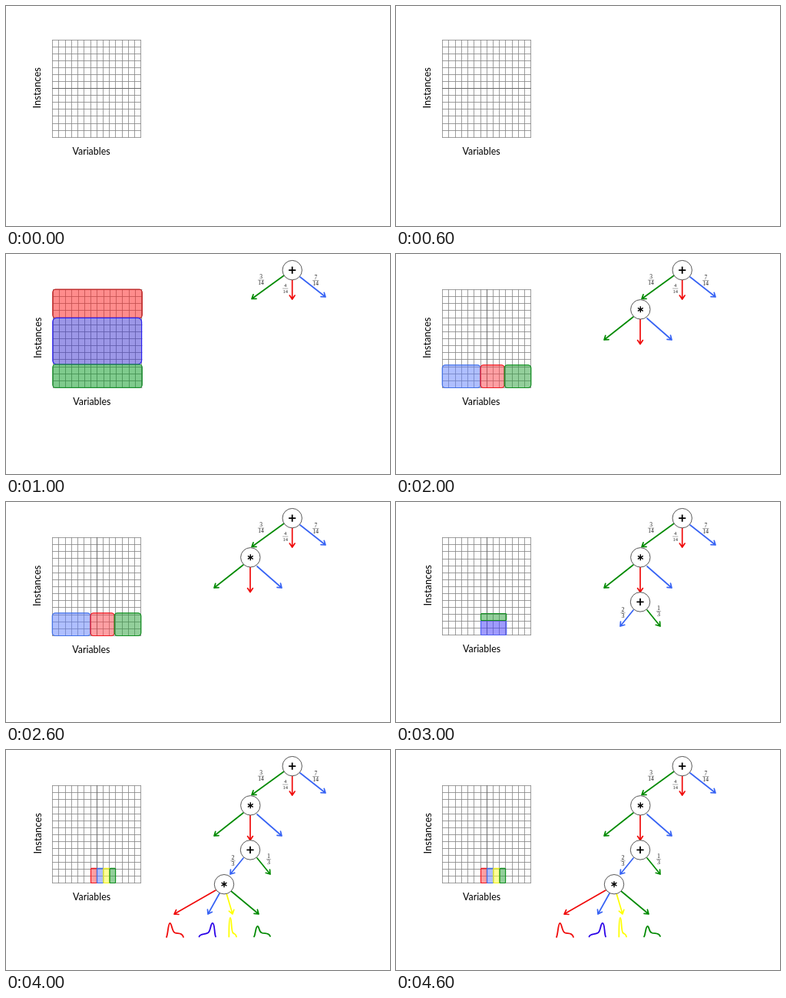
An HTML page that plays this animation: 500 by 287 pixels, repeating every 5000 ms.

```html
<!DOCTYPE html>
<html lang="en">
<head>
<meta charset="utf-8">
<title>Splitting a table into a sum-product tree</title>
<style>
html, body { margin: 0; width: 100%; height: 100%; overflow: hidden; background: #fff; }
svg { display: block; width: 500px; height: 287px; }
.label { font: 12.4px Lato, Carlito, sans-serif; }
.side { font-size: 13px; }
.frac { font-family: "Liberation Serif", serif; fill: #222; text-anchor: middle; }
</style>
</head>
<body>
<svg id="stage" viewBox="0 0 500 287"></svg>
<script>
const stage = document.getElementById('stage');
const GREEN = '#008a00', RED = '#f00a0a', BLUE = '#3763f4', YELLOW = '#ffff00';

const path = (d, color, width) =>
  `<path d="${d}" fill="none" stroke="${color}" stroke-width="${width}" stroke-linecap="round" stroke-linejoin="round"/>`;

const snap = v => Math.round(v - .5) + .5;

function grid(x, y, w, h) {
  const left = snap(x), top = snap(y);
  let d = '';
  for (let i = 0; i <= 14; i++) {
    d += `M${snap(x + i * w / 14)} ${top}v${h}M${left} ${snap(y + i * h / 14)}h${w}`;
  }
  return path(d, '#858585', .8);
}
const midline = () => path('M118.5 46.5v127', '#666', .9);

const labels = (x, y, sideX, sideY) =>
  `<text class="label" x="${x}" y="${y}">Variables</text>` +
  `<text class="label side" transform="translate(${sideX} ${sideY}) rotate(-90)">Instances</text>`;

const block = (x, y, w, h, fill, stroke, r = 4) =>
  `<rect x="${x}" y="${y}" width="${w}" height="${h}" rx="${r}" fill="${fill}" fill-opacity=".5" stroke="${stroke}" stroke-width="1.2"/>`;

function arrow(x1, y1, x2, y2, color) {
  const a = Math.atan2(y2 - y1, x2 - x1);
  const barb = s => `${x2 - 6 * Math.cos(a + s)} ${y2 - 6 * Math.sin(a + s)}`;
  return path(`M${x1} ${y1}L${x2} ${y2}M${barb(.6)}L${x2} ${y2}L${barb(-.6)}`, color, 1.7);
}

// A circle holding a symbol made of evenly turned strokes
function node(x, y, strokes, radius, width) {
  let d = '';
  for (let i = 0; i < strokes; i++) {
    const a = Math.PI * (i / strokes + .5);
    const dx = radius * Math.cos(a), dy = radius * Math.sin(a);
    d += `M${x - dx} ${y - dy}L${x + dx} ${y + dy}`;
  }
  return `<circle cx="${x}" cy="${y}" r="12.7" fill="#fff" stroke="#444" stroke-width=".9"/>` +
    `<path d="${d}" stroke="#000" stroke-width="${width}"/>`;
}
const sum = (x, y) => node(x, y, 2, 4.6, 1.8);
const product = (x, y) => node(x, y, 3, 4, 1.4);

function fraction(x, y, top, bottom, size = 7.5) {
  const half = bottom > 9 ? size * .5 : size * .34;
  return `<g class="frac" font-size="${size}"><text x="${x}" y="${y - 1.8}">${top}</text>` +
    `<text x="${x}" y="${y + size * .86}">${bottom}</text></g>` +
    path(`M${x - half} ${y}h${2 * half}`, '#777', .6);
}

const root = () =>
  arrow(362, 28, 320, 58.5, GREEN) + arrow(372.7, 34, 372.7, 59, RED) + arrow(383, 30, 416, 56, BLUE) +
  fraction(332, 34, 3, 14) + fraction(363.7, 45, 4, 14, 6.5) + fraction(403.3, 34.5, 7, 14) +
  sum(372.7, 21.1);

const second = () =>
  arrow(309, 82, 271, 112, GREEN) + arrow(318, 85, 318, 117.5, RED) + arrow(327, 84, 359, 112, BLUE) +
  product(318.3, 72.3);

const third = () =>
  arrow(309, 141, 292, 162, BLUE) + arrow(327, 141, 344, 162, GREEN) +
  fraction(295.5, 144.5, 2, 3, 8) + fraction(342, 142.5, 1, 3, 8) +
  sum(318, 130.4);

const fourth = () =>
  arrow(273, 183, 219, 214, RED) + arrow(278, 187, 263, 214, BLUE) +
  arrow(287, 187, 295, 214, YELLOW) + arrow(293, 184, 329, 214, GREEN) +
  product(284, 175.2) +
  path('M209 244C211 240 211 226 213.5 226S216 237 220 238.5S229 238 231 244', RED, 1.8) +
  path('M251.5 243.5C253 239 259 241 263 238.5S266 226 269 226S271 239 273 243.5', '#2a00e8', 1.8) +
  path('M290.3 243.5C290.5 238 290 219 292 219S293 236 295.5 238.5S299 239 300 243.5', YELLOW, 1.8) +
  path('M323 243.5C325 240 325 230 327.5 230S329 237 333 238.5S342 238 344 243', GREEN, 1.8);

const scenes = [
  () => grid(60.75, 44.2, 115, 127) + path('M60.5 107.5h115', '#666', .9) + labels(86.5, 193.5, 45, 133.5),

  () => grid(61, 46.5, 115.5, 128) + labels(87.3, 196.5, 46, 136) +
    block(60.8, 46.2, 116.5, 37.2, '#ff1a1a', '#c02020') +
    block(60.8, 83.4, 115.8, 60.6, '#3a30d0', '#2a20f0', 5) +
    block(60.8, 144, 116.5, 30.4, '#00981c', '#1d9030') + root(),

  () => grid(60.75, 46.5, 115, 128) + midline() + labels(86.3, 196.8, 45, 136) +
    block(60.3, 144.8, 49.7, 29.7, '#6080ff', '#4070e8') +
    block(110, 144.8, 31.2, 29.7, '#ff4048', '#f01820') +
    block(141.2, 144.8, 34.6, 29.7, '#28a038', '#109020') + root() + second(),

  () => grid(60.75, 46.8, 115, 127) + midline() + labels(87, 196, 46, 135.5) +
    block(110.5, 154.5, 33.2, 19, '#4038ff', '#5060f0', 1) +
    block(110.5, 145.5, 33.2, 9, '#28a038', '#109020', 1) + root() + second() + third(),

  () => grid(60.75, 46.8, 115, 127) + midline() + labels(87, 195.8, 46, 135.5) +
    block(110.5, 154.3, 8, 19.2, '#ff4048', '#f01820', 1) +
    block(118.5, 154.3, 8.3, 19.2, '#6080ff', '#4070e8', 1) +
    block(126.8, 154.3, 8.2, 19.2, '#ffff30', '#f0f020', 1) +
    block(135, 154.3, 7.6, 19.2, '#28a038', '#109020', 1) +
    root() + second() + third() + fourth()
];

let shown = -1;
function draw() {
  const step = Math.floor(performance.now() / 1000) % scenes.length;
  if (step !== shown) stage.innerHTML = scenes[shown = step]();
  requestAnimationFrame(draw);
}
draw();
</script>
</body>
</html>
```
